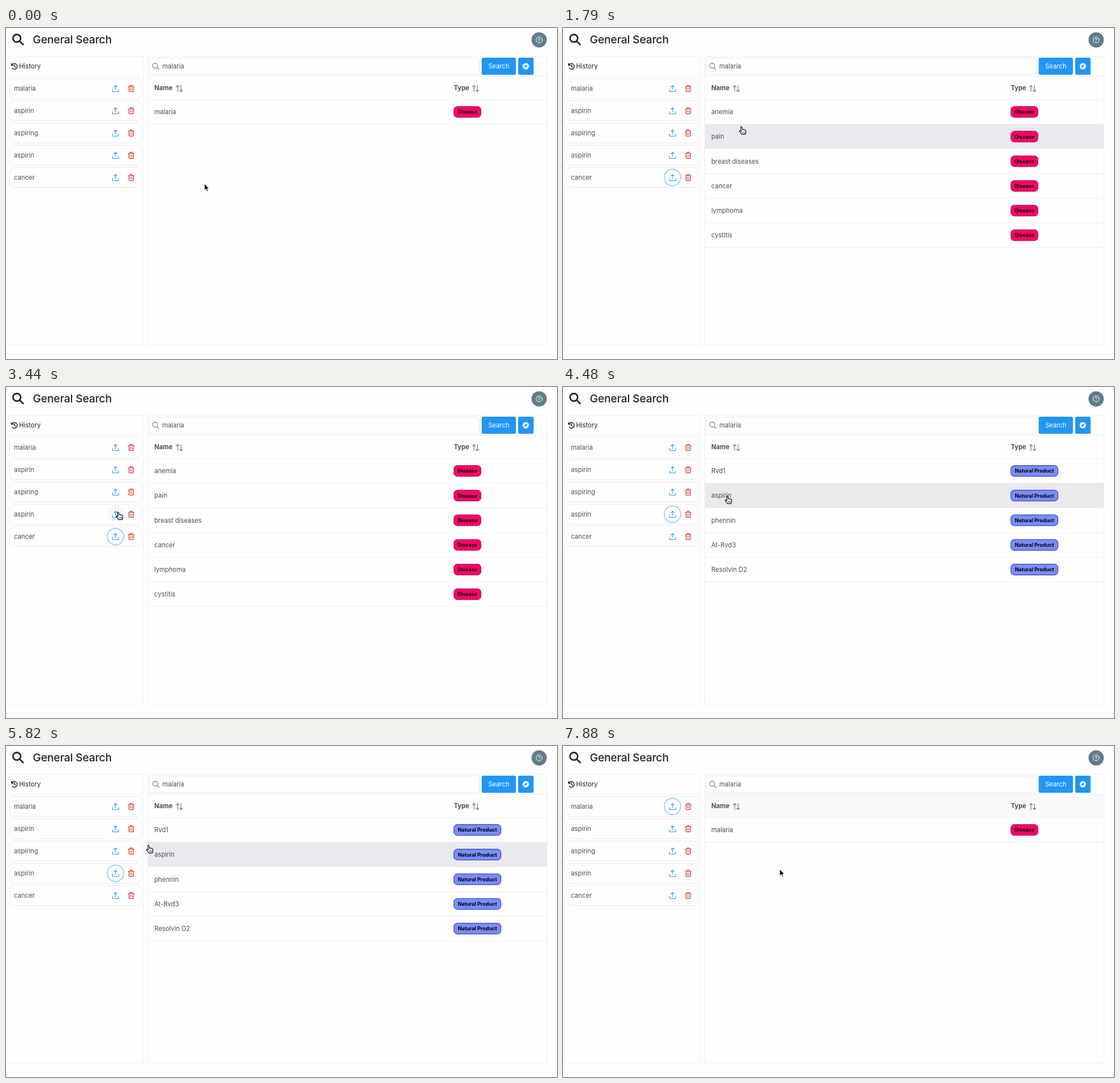
Recreate the animation shown at these times as an HTML page. Size 966 by 580 pixels, loop 7.9 s.

```html
<!DOCTYPE html>
<html lang="en">
<head>
<meta charset="utf-8">
<title>General Search</title>
<style>
  html, body { margin: 0; width: 100%; height: 100%; overflow: hidden; background: #fefefe; }
  svg { display: block; width: 966px; height: 580px; font: 11.2px Inter, sans-serif; fill: #495057; }
  .line { fill: none; stroke: #eeeff1; }
  .card { fill: #fefefe; stroke: #e7e9ec; }
  .icon { fill: none; stroke: currentColor; stroke-linecap: round; stroke-linejoin: round; }
  .title { font-size: 19.2px; font-weight: 500; letter-spacing: -.2px; fill: #212529; }
  .head { font-weight: 700; }
  .badge { font-size: 8.96px; font-weight: 700; fill: #000; text-anchor: middle; }
</style>
</head>
<body>
<svg viewBox="0 0 966 580">
  <defs>
    <g id="upload" class="icon" color="#2196f3" stroke-width="1.1">
      <path d="M0 2.2V-5M-2.7-2.6L0-5.3 2.7-2.6M-5.5 1.8V4.4Q-5.5 5.5-4.4 5.5H4.4Q5.5 5.5 5.5 4.4V1.8"/>
    </g>
    <g id="trash" class="icon" color="#d32f2f" stroke-width="1.1">
      <path d="M-5-3.2H5M-4-3.2V4.2Q-4 5.4-2.8 5.4H2.8Q4 5.4 4 4.2V-3.2M-2.2-3.2V-4.4Q-2.2-5.4-1.2-5.4H1.2Q2.2-5.4 2.2-4.4V-3.2M-1.5-.6V2.8M1.5-.6V2.8"/>
    </g>
    <g id="sort" class="icon" color="#6c757d" stroke-width="1.1">
      <path d="M-3 5.5V-5.3M-5.6-2.7L-3-5.3-.4-2.7M3-5.3V5.5M.4 2.9L3 5.5 5.6 2.9"/>
    </g>
    <g id="arrow">
      <path d="M0 0V11.5L2.7 9 4.6 13.2 6.4 12.4 4.6 8.4H8Z" fill="#000" stroke="#fff" stroke-width=".8"/>
    </g>
    <g id="hand" stroke="#000" stroke-width="1.1" stroke-linejoin="round">
      <path fill="#fff" d="M-1.6 1Q-.5-.6.6.8L1.5 5Q2.7 4 3.8 5.3 5 4.6 5.8 6 7.4 5.6 7.6 7.2V10Q7 11.5 6.6 13.4H.4Q-.6 11.6-2.4 9.9L-3.9 8Q-3.6 6.4-2 7L-.4 8.2Z"/>
      <path fill="none" stroke-width=".8" d="M2 8.8v2.6M3.9 8.8v2.6M5.7 8.8v2.6"/>
    </g>
  </defs>

  <g class="icon" color="#212529" stroke-width="2.7">
    <circle cx="19" cy="18" r="6.7"/><path d="M24 23L30 29"/>
  </g>
  <text class="title" x="47" y="27">General Search</text>
  <circle cx="934.7" cy="20.8" r="13.4" fill="#607d8b"/>
  <g class="icon" color="#fff">
    <circle cx="934.7" cy="20.8" r="5.3"/>
    <path d="M933.1 19.4Q933.2 17.9 934.7 17.9T936.3 19.4Q936.3 20.4 934.7 21V21.8M934.7 23.5v.1"/>
  </g>

  <path class="line" d="M2.5 49.5H240.5V555.5H2.5ZM2.5 84.5H240.5M248.5 49.5H948.5V555.5H248.5ZM0 571.5H966"/>
  <g class="icon" color="#212529" stroke-width="1.4">
    <path d="M10.4 64.6A5 5 0 1 1 11 70.6M9.6 62V65.2H12.8M14.8 64.4V67.4L16.8 68.8"/>
  </g>
  <text x="23" y="71.2" fill="#212529">History</text>
  <g id="history"></g>

  <rect id="header" x="249" y="85" width="699" height="40" fill="#f8f9fa"/>
  <path class="line" d="M248.5 84.5H948.5M248.5 125.5H948.5"/>
  <rect x="250.5" y="52.5" width="579" height="29" rx="3" class="card"/>
  <g class="icon" color="#6c757d" stroke-width="1.1">
    <circle cx="261.5" cy="66" r="4.4"/><path d="M264.8 69.3L268 72.5"/>
  </g>
  <text x="274" y="71.2">malaria</text>
  <rect x="834" y="52" width="60" height="30" rx="2.5" fill="#2196f3"/>
  <text x="864" y="71.2" fill="#fff" text-anchor="middle">Search</text>
  <rect x="898" y="52" width="27" height="30" rx="2.5" fill="#2196f3"/>
  <circle cx="911.3" cy="67" r="5.5" fill="#fff"/>
  <path d="M914.4 63.9L912.6 68.3 908.2 70.1 910 65.7Z" fill="#2196f3"/>
  <text class="head" x="260" y="109.4">Name</text><use href="#sort" x="304" y="106"/>
  <text class="head" x="785" y="109.4">Type</text><use href="#sort" x="823.5" y="106"/>

  <g id="table"></g>
  <use id="cursor"/>
</svg>
<script>
const LOOP = 7900, STEP = 148.9;
const ROW_TOP = 125.4, ROW_H = 43.2;
const $ = id => document.getElementById(id);
const searches = ['malaria', 'aspirin', 'aspiring', 'aspirin', 'cancer'];
const buttonY = i => 106 + 39 * i;

const disease = { label: 'Disease', width: 47.5, fill: '#fa0566', edge: '#a30a4b' };
const product = { label: 'Natural Product', width: 82.5, fill: '#7a8cff', edge: '#26318f' };
const malaria = { type: disease, names: ['malaria'] };
const cancer = { type: disease, names: ['anemia', 'pain', 'breast diseases', 'cancer', 'lymphoma', 'cystitis'] };
const aspirin = { type: product, names: ['Rvd1', 'aspirin', 'phennin', 'At-Rvd3', 'Resolvin D2'] };

// [first step, value]
const results = [[0, malaria], [7, cancer], [25, aspirin], [45, malaria]];
const focused = [[0, -1], [6, 4], [24, 3], [44, 0]];
// [step, x, y] of the pointer tip
const path = [
  [0, 348, 273], [2, 290, 271], [5, 197, 263], [8, 195, 262],
  [10, 240, 228], [12, 313, 173], [13, 322, 205], [15, 305, 284],
  [17, 282, 297], [19, 245, 268], [21, 203, 226], [22, 198, 221], [23, 197, 219], [26, 197, 220],
  [28, 238, 200], [30, 288, 191], [32, 308, 226], [34, 310, 272], [35, 310, 272],
  [37, 286, 228], [39, 250, 174], [41, 212, 124], [43, 194, 109], [44, 195, 109],
  [46, 247, 120], [48, 325, 122], [50, 372, 146], [51, 379, 160], [53, 380, 216]
];

const current = (list, step) => list.findLast(([from]) => from <= step)[1];

function pointer(step) {
  const i = path.findLastIndex(([s]) => s <= step);
  const [s0, x0, y0] = path[i], [s1, x1, y1] = path[i + 1] || [s0 + 1, x0, y0];
  const k = (step - s0) / (s1 - s0);
  return [x0 + (x1 - x0) * k, y0 + (y1 - y0) * k];
}

const historyItem = (name, i, focus, hover) => {
  const y = buttonY(i);
  return `<rect class="card" x="6.5" y="${y - 17.5}" width="230" height="35" rx="7"/>
    <text x="14" y="${y + 4.2}">${name}</text>
    ${hover ? `<circle cx="192" cy="${y}" r="14" fill="#2196f3" fill-opacity=".05"/>` : ''}
    ${focus ? `<circle cx="192" cy="${y}" r="14.4" fill="none" stroke="#a6d5fa" stroke-width="2.2"/>` : ''}
    <use href="#upload" x="192" y="${y}"/><use href="#trash" x="219.5" y="${y}"/>`;
};

const tableRow = (name, i, type, hover) => {
  const top = ROW_TOP + ROW_H * i, mid = top + 21.8, line = Math.floor(top + ROW_H) + .5;
  return `${hover ? `<rect x="249" y="${top}" width="699" height="${ROW_H}" fill="#e9e9ee"/>` : ''}
    <path class="line" d="M248.5 ${line}H948.5"/>
    <text x="260" y="${mid + 4}">${name}</text>
    <rect x="785.2" y="${mid - 9.6}" width="${type.width}" height="19" rx="6" fill="${type.fill}" stroke="${type.edge}"/>
    <text class="badge" x="${785.2 + type.width / 2}" y="${mid + 3.1}">${type.label}</text>`;
};

function draw(step) {
  const [x, y] = pointer(step);
  const { type, names } = current(results, step);
  const focus = current(focused, step);
  const inTable = x > 246;
  const onButton = i => Math.hypot(x - 192, y - buttonY(i)) < 15;
  const hoverRow = inTable ? Math.floor((y - ROW_TOP) / ROW_H) : -1;
  const clickable = inTable ? y < ROW_TOP + ROW_H * names.length : searches.some((_, i) => onButton(i));

  $('history').innerHTML = searches.map((name, i) => historyItem(name, i, i === focus, onButton(i))).join('');
  $('table').innerHTML = names.map((name, i) => tableRow(name, i, type, i === hoverRow)).join('');
  $('header').setAttribute('opacity', step < 46 ? 0 : step < 47 ? .4 : 1);
  $('cursor').setAttribute('href', clickable ? '#hand' : '#arrow');
  $('cursor').setAttribute('transform', `translate(${x} ${y})`);
}

let shown = -1;
function tick() {
  const step = Math.min(53, Math.floor((performance.now() % LOOP + 12) / STEP));
  if (step !== shown) draw(shown = step);
  requestAnimationFrame(tick);
}
tick();
</script>
</body>
</html>
```
